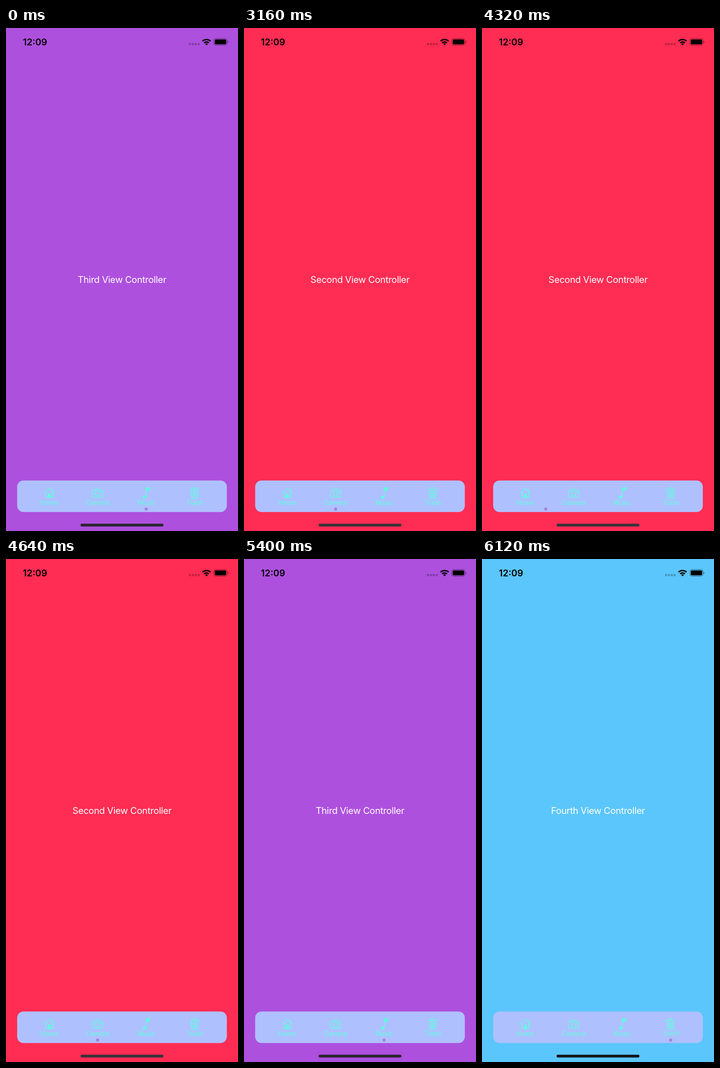
Animation of 509 by 1101 pixels, one loop 6.16 s. Source, as an HTML page:

```html
<!DOCTYPE html>
<html lang="en">
<head>
<meta charset="utf-8">
<title>Tab bar</title>
<style>
  html, body { margin: 0; width: 100%; height: 100%; overflow: hidden; }
  svg { display: block; width: 100%; height: 100%; font-family: Inter, "Liberation Sans", sans-serif; }
  #title { font-size: 20.3px; letter-spacing: -.38px; fill: #fff; text-anchor: middle; }
  #clock { font-size: 20px; font-weight: 600; }
  .tab text { font-size: 14px; text-anchor: middle; fill: #5cffdc; }
  .tab path, .tab circle { fill: none; stroke: #5cffdc; stroke-width: 1.6; stroke-linecap: round; stroke-linejoin: round; }
  .tab .solid { fill: #5cffdc; stroke-width: .6; }
</style>
</head>
<body>
<svg viewBox="0 0 509 1101" preserveAspectRatio="none">
  <rect id="back" width="509" height="1101"/>
  <text id="clock" x="37" y="38">12:09</text>
  <path d="M401.5 35.3h4.4m1.9 0h4.4m1.9 0h4.4m1.9 0h4.4" stroke="#000" stroke-opacity=".25" stroke-width="4.4"/>
  <g fill="none" stroke="#000" stroke-width="3">
    <path d="M431.2 28.8a12.6 12.6 0 0 1 17.6 0M434.6 32.6a7.8 7.8 0 0 1 10.8 0"/>
    <path d="M440 38l-3-3a4.4 4.4 0 0 1 6 0z" fill="#000" stroke="none"/>
  </g>
  <rect x="456.2" y="23.2" width="28.6" height="14.4" rx="4.2" fill="none" stroke="#000" stroke-opacity=".45" stroke-width="1.2"/>
  <rect x="458" y="25" width="25" height="10.8" rx="2.6"/>
  <path d="M486.2 28v5q1.8-.8 1.8-2.5t-1.8-2.5z" fill-opacity=".45"/>

  <text id="title" x="254.5" y="558"></text>

  <rect x="24.5" y="990.5" width="460" height="69" rx="14" fill="#afc0ff"/>
  <g class="tab" transform="translate(94.7 1025)">
    <path d="M-10-7.5L.5-17 11-7.5M-7.2-9.5V2.6H8.2V-9.5M7-11.5v-3.7"/>
    <path class="solid" d="M-2.2 2.5v-8h5.4v8z"/>
    <text y="18.5">Home</text>
  </g>
  <g class="tab" transform="translate(201 1025)">
    <path d="M-9-13h3.5l2-2.6h7l2 2.6H9q2.3 0 2.3 2.3V-.3Q11.3 2 9 2H-9q-2.3 0-2.3-2.3v-10.4Q-11.3-13-9-13z"/>
    <circle cy="-6" r="5"/>
    <circle class="solid" cx="8" cy="-9.6" r=".9"/>
    <text y="18.5">Camera</text>
  </g>
  <g class="tab" transform="translate(307.5 1025)">
    <path d="M.1 1V-17"/>
    <path class="solid" d="M0-17.8q0-.8 1-1l6.4-1.2q.9-.1.9.8v4.2q0 1.2-1.2 1.5L.7-12z"/>
    <path class="solid" d="M.8 0C.8 3-2 5-4.6 5S-7.5 2.8-6.7 1-3.2-.6 0-1.5z"/>
    <text y="18.5">Music</text>
  </g>
  <g class="tab" transform="translate(414 1025)">
    <path d="M-9.4-15H9.4M-4-15v-1.7q0-2 2-2h4q2 0 2 2v1.7M-7.4-15l1 17.8Q-6.2 5-4 5h8Q6.2 5 6.4 2.8L7.4-15M-3.5-11.3L-3 1.5M0-11.3V1.5M3.5-11.3L3 1.5"/>
    <text y="18.5">Trash</text>
  </g>
  <circle id="dot" cy="1053" r="3.5" fill="#a383dc"/>
  <rect id="handle" x="163.5" y="1085" width="182" height="6.2" rx="3.1"/>
</svg>
<script>
  const LOOP = 6160, TICK = 40;
  const pages = [
    { name: "First", x: 94.7, back: "#ff9500", handle: "#141414" },
    { name: "Second", x: 201, back: "#ff2c53", handle: "#3a343b" },
    { name: "Third", x: 307.5, back: "#ad50de", handle: "#2c2630" },
    { name: "Fourth", x: 414, back: "#5bc6fb", handle: "#14191d" }
  ];
  // Start time, selected page, wiggle duration
  const taps = [[-1000, 2, 280], [2840, 1, 320], [3560, 0, 280], [4320, 1, 320], [5120, 2, 280], [5880, 3, 280]];
  const get = id => document.getElementById(id);
  const [back, title, dot, handle] = ["back", "title", "dot", "handle"].map(get);
  const tabs = [...document.querySelectorAll(".tab")];
  const clamp = v => Math.min(1, Math.max(0, v));
  const ease = v => v * v * (3 - 2 * v);

  function draw(time) {
    const i = taps.findLastIndex(tap => tap[0] <= time);
    const [start, index, length] = taps[i];
    const page = pages[index];
    const from = pages[taps[Math.max(0, i - 1)][1]].x;
    const age = time - start;

    // The dot is already under way when the page switches
    dot.setAttribute("cx", from + (page.x - from) * ease(clamp((age + 135) / 300)));
    back.setAttribute("fill", page.back);
    handle.setAttribute("fill", page.handle);
    title.textContent = page.name + " View Controller";

    const angle = 6.5 * Math.sin(2 * Math.PI * clamp(age / length));
    tabs.forEach((tab, n) => tab.setAttribute("transform",
      `translate(${pages[n].x} 1025) rotate(${n === index ? angle : 0})`));
  }

  const origin = performance.now();
  function frame() {
    const time = (performance.now() - origin) % LOOP;
    draw(Math.floor(time / TICK) * TICK);
    requestAnimationFrame(frame);
  }
  frame();
</script>
</body>
</html>
```
